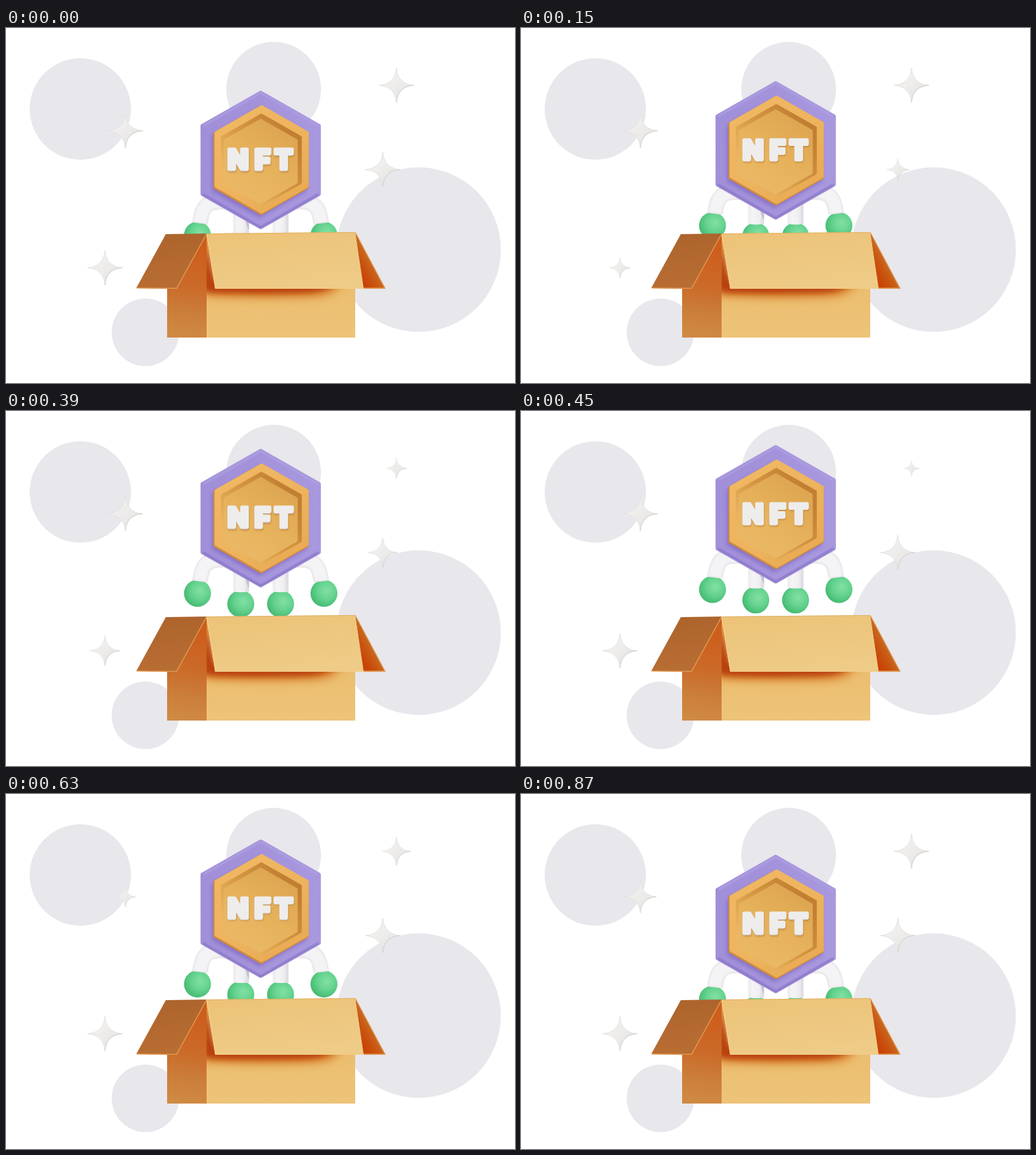
These frames come from a looping animation (774 by 539 pixels, 900 ms). An HTML page:

```html
<!DOCTYPE html>
<html lang="en">
<head>
<meta charset="utf-8">
<title>NFT box</title>
<style>
html, body { margin: 0; width: 100%; height: 100%; overflow: hidden; background: #fff; }
svg { display: block; width: 774px; height: 539px; }
.badge { animation: lift 900ms steps(15) -3ms infinite; }
.star { animation: 900ms -3ms infinite; }
.s1 { animation-name: twinkle1; }
.s2 { animation-name: twinkle2; }
.s3 { animation-name: twinkle3; }
.s4 { animation-name: twinkle4; }
@keyframes lift {
  0%, 100% { transform: translateY(0); }
  50% { transform: translateY(-43.5px); }
}
@keyframes twinkle1 {
  0% { transform: scale(1); }
  23.3333% { transform: scale(1); animation-timing-function: steps(8); }
  50% { transform: scale(.46); animation-timing-function: steps(9); }
  80%, 100% { transform: scale(1); }
}
@keyframes twinkle2 {
  0% { transform: scale(1); animation-timing-function: steps(8); }
  26.6667% { transform: scale(.45); animation-timing-function: steps(7); }
  50%, 100% { transform: scale(1); }
}
@keyframes twinkle3 {
  0% { transform: scale(1); animation-timing-function: steps(7); }
  23.3333% { transform: scale(.45); animation-timing-function: steps(8); }
  50%, 100% { transform: scale(1); }
}
@keyframes twinkle4 {
  0% { transform: scale(1); }
  50% { transform: scale(1); animation-timing-function: steps(8); }
  76.6667% { transform: scale(.47); animation-timing-function: steps(7); }
  100% { transform: scale(1); }
}
.label { font: 900 41px Inter, "Noto Sans", sans-serif; text-anchor: middle; stroke-width: 4.8; stroke-linejoin: round; }
</style>
</head>
<body>
<svg viewBox="0 0 774 539">
  <defs>
    <polygon id="hex" points="0,-102 88.5,-51.8 88.5,51.8 0,102 -88.5,51.8 -88.5,-51.8" stroke-width="6" stroke-linejoin="round"/>
    <g id="star">
      <path d="M0-26.5Q2-2 26.5 0Q2 2 0 26.5Q-2 2-26.5 0Q-2-2 0-26.5Z" fill="url(#starFill)" stroke="#e3e1de" stroke-width="1" stroke-linejoin="round"/>
      <path d="M0 26Q1.400 1.400 26 0" fill="none" stroke="#d0cecb"/>
    </g>
    <radialGradient id="ball" cx=".6" cy=".4" r=".65">
      <stop stop-color="#82e0a4"/><stop offset=".5" stop-color="#66d390"/><stop offset="1" stop-color="#41b86f"/>
    </radialGradient>
    <linearGradient id="starFill" x2="1" y2="1">
      <stop offset=".3" stop-color="#f1f0ee"/><stop offset=".7" stop-color="#eae8e6"/>
    </linearGradient>
    <linearGradient id="tube">
      <stop stop-color="#eceaed"/><stop offset=".3" stop-color="#f5f4f6"/><stop offset=".7" stop-color="#efeef0"/><stop offset="1" stop-color="#d9d6df"/>
    </linearGradient>
    <linearGradient id="purple" y2=".35">
      <stop stop-color="#7b66bd"/><stop offset=".03" stop-color="#9482d0"/><stop offset=".08" stop-color="#a08fd8"/><stop offset="1" stop-color="#a898de"/>
    </linearGradient>
    <linearGradient id="rim" x2=".8" y2="1">
      <stop stop-color="#f1b964"/><stop offset=".6" stop-color="#eeb35d"/><stop offset="1" stop-color="#e8aa53"/>
    </linearGradient>
    <linearGradient id="wall" x1=".85" y1=".2" x2=".15" y2=".8">
      <stop stop-color="#c27f33"/><stop offset=".5" stop-color="#d59743"/><stop offset="1" stop-color="#ecb763"/>
    </linearGradient>
    <linearGradient id="floor" x1=".8" x2=".2" y2="1">
      <stop stop-color="#dca34e"/><stop offset=".5" stop-color="#e6b15b"/><stop offset="1" stop-color="#ebba67"/>
    </linearGradient>
    <linearGradient id="leftFlap" x1=".5" x2=".7" y2="1">
      <stop stop-color="#ad642c"/><stop offset="1" stop-color="#b96e33"/>
    </linearGradient>
    <linearGradient id="side" gradientUnits="userSpaceOnUse" x1="295" y1="330" x2="272" y2="470">
      <stop stop-color="#cd5d1b"/><stop offset=".45" stop-color="#cb6a29"/><stop offset=".75" stop-color="#cb7f3b"/><stop offset="1" stop-color="#d08a43"/>
    </linearGradient>
    <linearGradient id="front" x2="0" y2="1">
      <stop stop-color="#e9b765"/><stop offset="1" stop-color="#edc479"/>
    </linearGradient>
    <linearGradient id="frontFlap" x2=".3" y2="1">
      <stop stop-color="#ecc277"/><stop offset="1" stop-color="#eecb86"/>
    </linearGradient>
    <linearGradient id="rightFlap" gradientUnits="userSpaceOnUse" x1="535" y1="378" x2="566" y2="361">
      <stop stop-color="#c93c04"/><stop offset=".5" stop-color="#c9540f"/><stop offset="1" stop-color="#c8762f"/>
    </linearGradient>
    <filter id="wide" x="-30%" y="-50%" width="160%" height="200%"><feGaussianBlur stdDeviation="7"/></filter>
    <filter id="soft" x="-30%" y="-50%" width="160%" height="200%"><feGaussianBlur stdDeviation="4"/></filter>
    <filter id="slight"><feGaussianBlur stdDeviation="1.2"/></filter>
    <clipPath id="frontClip"><path d="M305 313V470H531V313Z"/></clipPath>
  </defs>

  <g fill="#e8e7ec">
    <circle cx="113" cy="123" r="77"/>
    <circle cx="407" cy="93" r="72"/>
    <circle cx="627.5" cy="336.5" r="125"/>
    <circle cx="212" cy="462" r="51.3"/>
  </g>

  <g transform="translate(593.7 87)"><use href="#star" class="star s1"/></g>
  <g transform="translate(573 215)"><use href="#star" class="star s2"/></g>
  <g transform="translate(150.5 364)"><use href="#star" class="star s3"/></g>
  <g transform="translate(181.5 156)"><use href="#star" class="star s4"/></g>

  <g class="badge">
    <g fill="url(#ball)">
      <circle cx="291.2" cy="314.5" r="20.5"/>
      <circle cx="357" cy="330.5" r="20.5"/>
      <circle cx="417.5" cy="330.5" r="20.5"/>
      <circle cx="483.5" cy="314.5" r="20.5"/>
    </g>
    <g fill="none" stroke-width="24">
      <g stroke="#e9e7eb">
        <path d="M295 296.500C297 280 300 264 324 263.500H346"/>
        <path d="M479.300 296.500C477.300 280 474.300 264 450.300 263.500H428"/>
      </g>
      <g stroke="#f4f3f5" stroke-width="19" filter="url(#slight)">
        <path d="M295 295C297 280 300 264 324 263H346"/>
        <path d="M479.300 295C477.300 280 474.300 264 450.300 263H428"/>
      </g>
    </g>
    <path d="M345.500 250H369.500V312Q357.500 314 345.500 312Z" fill="url(#tube)"/>
    <path d="M362 275H369.500V306Q364 300 362 275Z" fill="#a79fc4" opacity=".5"/>
    <path d="M405.500 250H429.500V312Q417.500 314 405.500 312Z" fill="url(#tube)"/>

    <g transform="translate(387.3 200.3)">
      <use href="#hex" fill="url(#purple)" stroke="url(#purple)"/>
      <g fill="none" stroke-width="3" stroke-linejoin="round" filter="url(#slight)">
        <path d="M-88 52L0 102.500L88 52" stroke="#8975c8"/>
        <path d="M-87-52L0-102L87-52" stroke="#ad9de1"/>
      </g>
      <use href="#hex" transform="translate(-2 5) scale(.785)" fill="#7a63bd" stroke="#7a63bd" filter="url(#soft)" opacity=".7"/>
    </g>
    <g transform="translate(388.300 200.500)">
      <use href="#hex" transform="translate(-.6 .5) scale(.792)" fill="#cf8a40" stroke="#cf8a40"/>
      <use href="#hex" transform="translate(.5 -1) scale(.783)" fill="url(#rim)" stroke="url(#rim)"/>
      <use href="#hex" transform="scale(.672)" fill="url(#wall)" stroke="url(#wall)"/>
      <use href="#hex" transform="translate(-1 2) scale(.615)" fill="url(#floor)" stroke="url(#floor)"/>
    </g>
    <g class="label">
      <text x="353.800 391 423.200" y="216.500" fill="#bd8440" stroke="#bd8440" filter="url(#slight)" opacity=".7">NFT</text>
      <text x="352.800 390 422.200" y="214.800" fill="#d2cecb" stroke="#d2cecb">NFT</text>
      <text x="353 390.200 422.400" y="214.200" fill="#eeedec" stroke="#eeedec">NFT</text>
    </g>
  </g>

  <path d="M245 394H259L305 313V470H245Z" fill="url(#side)"/>
  <g clip-path="url(#frontClip)">
    <path d="M305 313L318 394H531V470H305Z" fill="url(#front)"/>
    <path d="M300 380H511Q509 405 470 408Q390 412 300 407Z" fill="#d9812f" filter="url(#wide)"/>
    <path d="M300 310L318 385H500Q494 400 455 402Q380 404 318 402L300 400Z" fill="#b8400b" filter="url(#soft)"/>
  </g>
  <path d="M531 310L577 395.500H543Z" fill="url(#rightFlap)"/>
  <path d="M531.500 311L576 395H544" fill="none" stroke="#e09a4e" stroke-width="1.300"/>
  <path d="M243 313L305 312L259.500 396L198 395Z" fill="url(#leftFlap)"/>
  <path d="M304.500 313.500L259.500 395.200L199 394.800" fill="none" stroke="#e0974c" stroke-width="1.500"/>
  <path d="M305 312L531 310L544 395.800H318Z" fill="url(#frontFlap)"/>
  <path d="M305.500 313L318.500 395.200H543.500" fill="none" stroke="#f4d08a" stroke-width="1.300"/>
  <path d="M305 312.500L531 310.300" stroke="#e2b163"/>
</svg>
</body>
</html>
```
